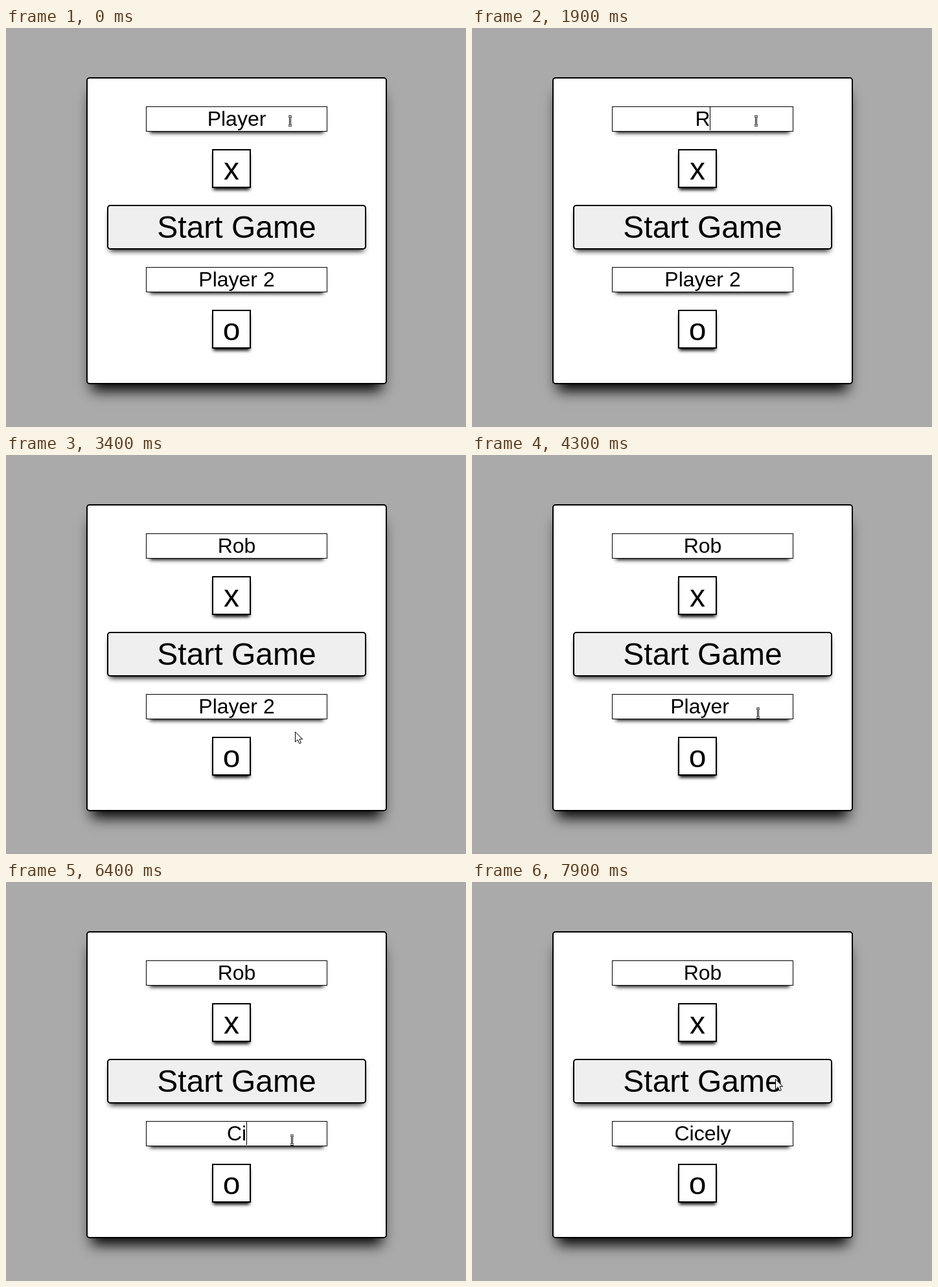
These frames come from a looping animation (710 by 616 pixels, 8 s). An HTML page:

```html
<!DOCTYPE html>
<html lang="en">
<head>
<meta charset="utf-8">
<title>Player setup</title>
<style>
html, body { margin: 0; width: 100%; height: 100%; overflow: hidden; background: #aaa; }
body { position: relative; font-family: "Liberation Sans", Arial, sans-serif; color: #000; }
div, svg { position: absolute; box-sizing: border-box; }
.card {
  left: 124px; top: 76px; width: 464px; height: 474px;
  background: #fff; border: 2px solid #000; border-radius: 5px;
  box-shadow: 0 18px 20px -8px #000;
}
.field {
  left: 216px; width: 280px; height: 39px;
  background: #fff; border: 1px solid #000;
  box-shadow: 0 8px 6px -6px #000;
  font-size: 32px; line-height: 36px; text-align: center; white-space: pre;
}
.mark, .start { border: 2px solid #000; font-size: 48px; line-height: 53px; text-align: center; }
.mark {
  left: 318px; width: 60px; height: 60px; padding-top: 2px;
  background: #fff; box-shadow: 0 5px 5px -2px #000;
}
.start {
  left: 156px; top: 273px; width: 400px; height: 69px; padding-top: 6px;
  background: #efefef; border-radius: 5px; box-shadow: 0 6px 8px -4px #000;
}
.caret { width: 1px; height: 36px; background: #000; }
svg { left: 0; top: 0; }
</style>
</head>
<body>
<div class="card"></div>
<div class="field" style="top:121px"><span></span></div>
<div class="mark" style="top:187px">x</div>
<div class="start">Start Game</div>
<div class="field" style="top:369px"><span></span></div>
<div class="mark" style="top:435px">o</div>
<div class="caret"></div>
<div class="caret"></div>
<svg width="710" height="616" fill="none">
  <g id="beam">
    <path id="bar" d="M-2.5-7H2.5M0-7V7M-2.5 7H2.5" stroke="#000" stroke-width="3"/>
    <use href="#bar"/>
    <path d="M-2.5-7H2.5M0-7V7M-2.5 7H2.5" stroke="#fff"/>
  </g>
  <path id="arrow" d="M.5.5V16L4.2 12.6 6.8 18.5 9.4 17.4 6.9 11.7H11.7Z" fill="#fff" stroke="#000"/>
</svg>
<script>
const LOOP = 8000;

// A trailing bar means that the caret is showing.
const typing = [
  [[0, 'Player'], [600, 'Pla|'], [800, 'Pl|'], [900, 'P|'], [1000, 'P'], [1200, ''],
   [1500, '|'], [1900, 'R|'], [2200, 'Ro|'], [2300, 'Rob|'], [2900, 'Rob'],
   [3500, 'Rob|'], [3800, 'Rob']],
  [[0, 'Player 2'], [3800, 'Player 2|'], [4300, 'Player '], [4500, 'Player'],
   [4600, 'Playe|'], [4700, 'Play|'], [4800, 'Pla|'], [4900, 'Pl|'], [5100, 'P|'],
   [5300, '|'], [5500, ''], [6000, '|'], [6200, 'C|'], [6400, 'Ci|'], [6600, 'Cic|'],
   [6700, 'Cice|'], [6900, 'Cicely|'], [7400, 'Cicely']]
];

// The pointer jumps between sampled places: time, shape, x, y.
const moves = [
  [0, 'beam', 438.5, 143.5], [2900, 'arrow', 527, 310], [3000, 'arrow', 503, 465],
  [3200, 'arrow', 478, 460], [3300, 'arrow', 456, 444], [3400, 'arrow', 446, 427],
  [3500, 'beam', 443.5, 404.5], [3600, 'beam', 442.5, 400.5], [3700, 'beam', 441.5, 398.5],
  [7500, 'beam', 448.5, 389.5], [7600, 'arrow', 464, 362], [7700, 'arrow', 475, 336],
  [7800, 'arrow', 476, 317], [7900, 'arrow', 468, 304]
];

const spans = document.querySelectorAll('.field span');
const carets = document.querySelectorAll('.caret');
const shapes = ['beam', 'arrow'].map(id => document.getElementById(id));

const at = (steps, t) => steps.findLast(step => step[0] <= t);

function drawField(i, t) {
  const value = at(typing[i], t)[1];
  const text = value.replace('|', '');
  const caret = carets[i].style;
  if (spans[i].textContent !== text) spans[i].textContent = text;
  const width = spans[i].getBoundingClientRect().width;
  caret.left = Math.floor(356 + width / 2) + 'px';
  caret.top = 122 + 248 * i + (text ? 0 : 1) + 'px';
  caret.visibility = value.endsWith('|') ? 'visible' : 'hidden';
}

function drawPointer(t) {
  const [, id, x, y] = at(moves, t);
  for (const shape of shapes) {
    shape.setAttribute('visibility', shape.id === id ? 'visible' : 'hidden');
    shape.setAttribute('transform', `translate(${x} ${y})`);
  }
}

function draw() {
  const t = performance.now() % LOOP;
  drawField(0, t);
  drawField(1, t);
  drawPointer(t);
  requestAnimationFrame(draw);
}
draw();
</script>
</body>
</html>
```
